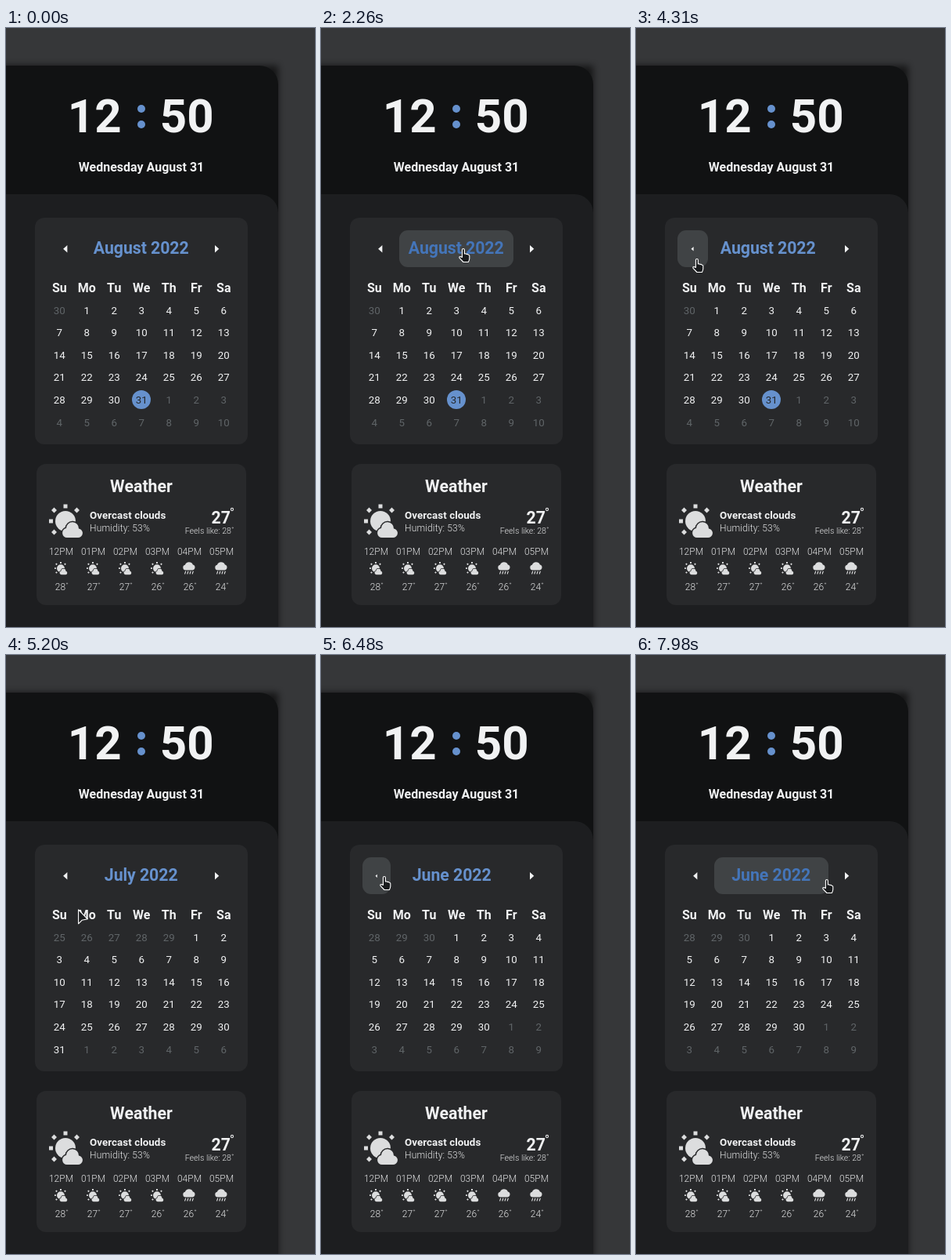
These frames come from a looping animation (395x764 px, 8 s). An HTML page:

```html
<!DOCTYPE html>
<html lang="en">
<head>
<meta charset="utf-8">
<title>Calendar panel</title>
<style>
html, body { margin: 0; width: 100%; height: 100%; overflow: hidden; background: #363739; }
svg { display: block; width: 395px; height: 764px; font-family: Roboto, sans-serif; }
text { fill: #f1f2f3; text-anchor: middle; white-space: pre; }
.bold { font-weight: 700; }
.head { font-size: 21.33px; font-weight: 700; }
.day { font-size: 13.33px; }
.light { font-weight: 300; font-size: 12px; fill: #e4e5e6; }
.start { text-anchor: start; }
.end { text-anchor: end; }
.ring { fill: none; stroke: #e4e5e6; }
.hover { fill: #404345; }
.white { fill: #f1f2f3; }
.cursor { fill: #1a1c1e; stroke: #fff; stroke-width: 1.1; stroke-linejoin: round; }
</style>
</head>
<body>
<svg viewBox="0 0 395 764">
  <defs>
    <filter id="blur" x="-20%" y="-20%" width="140%" height="140%"><feGaussianBlur stdDeviation="4"/></filter>
    <g id="sun" fill="#dcddde">
      <circle cx="21" cy="21.5" r="13"/>
      <path d="M18.5 0h5v5h-5zM0 19h5v5h-5zM6.5 4L10 7.500 6.500 11 3 7.500zM35.500 4L39 7.500 35.500 11 32 7.500zM6.500 32L10 35.500 6.500 39 3 35.500z"/>
      <path d="M23 42.500a6 6 0 0 1-1-11.900 8 8 0 0 1 16 .4 5.800 5.800 0 0 1-1.500 11.500z" stroke="#28292b" stroke-width="3" paint-order="stroke"/>
    </g>
    <g id="rain" fill="#dcddde">
      <path d="M3.500 10.500a3.400 3.400 0 0 1-.6-6.700 5.400 5.400 0 0 1 10-.3 3.600 3.600 0 0 1-.3 7z"/>
      <path d="M3.800 11.800l-1.300 3.700M7 11.800l-1.300 3.700M10.200 11.800l-1.300 3.700M13.400 11.800l-1.300 3.700" stroke="#dcddde" stroke-width="1.100"/>
    </g>
  </defs>

  <rect x="-20" y="48" width="368" height="740" fill="#000" opacity=".6" filter="url(#blur)"/>
  <path d="M0 48H324a24 24 0 0 1 24 24V764H0z" fill="#111213"/>
  <path d="M0 212H324a24 24 0 0 1 24 24V764H0z" fill="#1d1e20"/>

  <g class="bold" font-size="60">
    <text x="113.300" y="133">12</text>
    <text x="231.300" y="133">50</text>
  </g>
  <g fill="#6691cd"><circle cx="173" cy="103" r="5"/><circle cx="173" cy="123" r="5"/></g>
  <text class="bold" x="173" y="183" font-size="16">Wednesday August 31</text>

  <rect x="37" y="242" width="272" height="289" rx="12" fill="#28292b"/>
  <g class="hover">
    <rect id="prevBg" x="53" y="258" width="47" height="47" rx="11"/>
    <rect id="titleBg" x="100" y="258" width="146" height="47" rx="11"/>
    <rect id="nextBg" x="246" y="258" width="47" height="47" rx="11"/>
  </g>
  <path id="prev" class="white" d="M-3.400 0L1.900-4.700V4.700z"/>
  <path class="white" d="M272.300 281.800L267 277.100V286.500z"/>
  <text id="title" class="head" y="288" letter-spacing="-.08"></text>
  <g id="names"></g>
  <circle id="today" cx="173" cy="474" r="12" fill="#6691cd"/>
  <g id="days"></g>

  <rect x="39" y="556" width="268" height="180" rx="12" fill="#28292b"/>
  <text class="head" x="173" y="592">Weather</text>
  <use href="#sun" x="55" y="607.500"/>
  <text class="bold start" x="107" y="626" font-size="13.330" letter-spacing=".06">Overcast clouds</text>
  <text class="light start" x="107" y="642" letter-spacing=".15">Humidity: 53%</text>
  <text class="head end" x="287" y="632">27</text>
  <circle class="ring" cx="289" cy="614" r="1.600" stroke-width="1.100"/>
  <text class="light end" x="288" y="645" style="font-size:10.67px">Feels like: 28</text>
  <circle class="ring" cx="289.800" cy="637.500" r=".7" stroke-width=".5"/>
  <g id="hours"></g>

  <path id="arrow" class="cursor" d="M.6.8V18.800L5 14.300 12.300 12.800z"/>
  <path id="hand" class="cursor" d="M-.6 12.500V3a1.500 1.500 0 0 1 3 0V8Q4 7.300 5 8.600 6.500 8 7.300 9.300 9 9.200 8.800 11.300V14Q8.600 16.500 7.400 18.500H.9L-4 13.300Q-4.700 11.400-2.800 11.500z"/>
</svg>
<script>
const LOOP = 8000, ENTER = 920, STEP = 50, FADE = 120;
const SIDE = 47, TOP = 258, BOTTOM = 305;
const $ = id => document.getElementById(id);

function add(parent, tag, attrs, text = '') {
  const el = document.createElementNS('http://www.w3.org/2000/svg', tag);
  for (const key in attrs) el.setAttribute(key, attrs[key]);
  el.textContent = text;
  return parent.appendChild(el);
}

// Pointer legs: [start, end, x, y]
const legs = [
  [920, 950, 281, 278], [1470, 1520, 207, 281], [1670, 1740, 181, 280],
  [2310, 2500, 70, 294], [3180, 3470, 85, 332], [3540, 3820, 77, 293],
  [5050, 5200, 92, 324], [5270, 5540, 80, 281], [6680, 6820, 101, 327],
  [6960, 7350, 161, 296], [7500, 7590, 170, 291], [7740, 7980, 243, 285]
];
const presses = [{ down: 4310, flip: 4700, up: 4870 }, { down: 6080, flip: 6480, up: 6680 }];
const buttons = { prevBg: [53, 100], titleBg: [100, 246], nextBg: [246, 293] };

function pointerAt(t) {
  let x = 279, y = 278;
  for (const [start, end, toX, toY] of legs) {
    if (t < start) break;
    const count = ms => Math.floor(ms / STEP) + 1;
    const done = Math.min(1, count(t - start) / count(end - start));
    x += (toX - x) * done;
    y += (toY - y) * done;
  }
  return { x, y };
}

function isOver([left, right], t) {
  const { x, y } = pointerAt(t);
  return t >= ENTER && x >= left && x < right && y >= TOP && y < BOTTOM;
}

// Share of the last moments the pointer spent on the button
function hoverLevel(button, t) {
  const samples = 6;
  let hits = 0;
  for (let i = 0; i < samples; i++) hits += isOver(button, t - i * FADE / samples);
  return hits / samples;
}

function squeezeAt(t) {
  const press = presses.find(p => t >= p.down && t < p.up);
  return !press ? 0 : t < press.flip ? 8 : 11;
}

['Su', 'Mo', 'Tu', 'We', 'Th', 'Fr', 'Sa'].forEach((name, i) =>
  add($('names'), 'text', { class: 'bold', 'font-size': 16, x: 68.3 + 35 * i, y: 337 }, name));

const cells = Array.from({ length: 42 }, (_, i) => add($('days'), 'text', {
  class: 'day', x: 68.3 + 35 * (i % 7), y: Math.floor(365 + 28.6 * Math.floor(i / 7))
}));

[28, 27, 27, 26, 26, 24].forEach((temp, i) => {
  const x = 70.5 + 41 * i, g = $('hours');
  add(g, 'text', { class: 'light', x, y: 672 }, (i ? '0' + i : '12') + 'PM');
  add(g, 'use', i < 4
    ? { href: '#sun', transform: `translate(${x - 8.5} 681) scale(.38)` }
    : { href: '#rain', transform: `translate(${x - 8.5} 681)` });
  add(g, 'text', { class: 'light', x: x - 1, y: 717 }, temp);
  add(g, 'circle', { class: 'ring', cx: x + 7.5, cy: 708.5, r: .7, 'stroke-width': .5 });
});

const monthNames = ['August', 'July', 'June'];
let shown;
function showMonth(back) {
  if (shown === back) return;
  shown = back;
  const month = 7 - back;
  const lead = new Date(2022, month, 1).getDay();
  const size = new Date(2022, month + 1, 0).getDate();
  const last = new Date(2022, month, 0).getDate() - 1;
  $('title').textContent = monthNames[back] + ' 2022';
  $('today').style.display = back ? 'none' : '';
  cells.forEach((cell, i) => {
    const day = i - lead + 1, inside = day > 0 && day <= size;
    cell.textContent = day < 1 ? last + day : inside ? day : day - size;
    cell.style.fill = !inside ? '#606568' : !back && day === 31 ? '#25282c' : '#f1f2f3';
  });
}

function place(el, visible, { x, y }) {
  el.style.display = visible ? '' : 'none';
  el.setAttribute('transform', `translate(${x} ${y})`);
}

function draw(t) {
  showMonth(presses.filter(p => t >= p.flip).length);
  for (const id in buttons) $(id).setAttribute('opacity', hoverLevel(buttons[id], t));

  const squeeze = squeezeAt(t), width = SIDE - squeeze;
  $('prevBg').setAttribute('width', width);
  $('prev').setAttribute('transform',
    `translate(${53 + width / 2} 281.8) scale(${1 - squeeze * .05})`);
  $('title').setAttribute('x', 172.7 - squeeze / 2);
  $('title').style.fill = hoverLevel(buttons.titleBg, t) > .6 ? '#4475b9' : '#6691cd';

  const onButton = Object.values(buttons).some(b => isOver(b, t));
  const p = pointerAt(t);
  place($('hand'), onButton, p);
  place($('arrow'), t >= ENTER && !onButton, p);
}

let origin;
function tick(now) {
  origin ??= now;
  draw((now - origin) % LOOP);
  requestAnimationFrame(tick);
}
draw(0);
requestAnimationFrame(tick);
</script>
</body>
</html>
```
